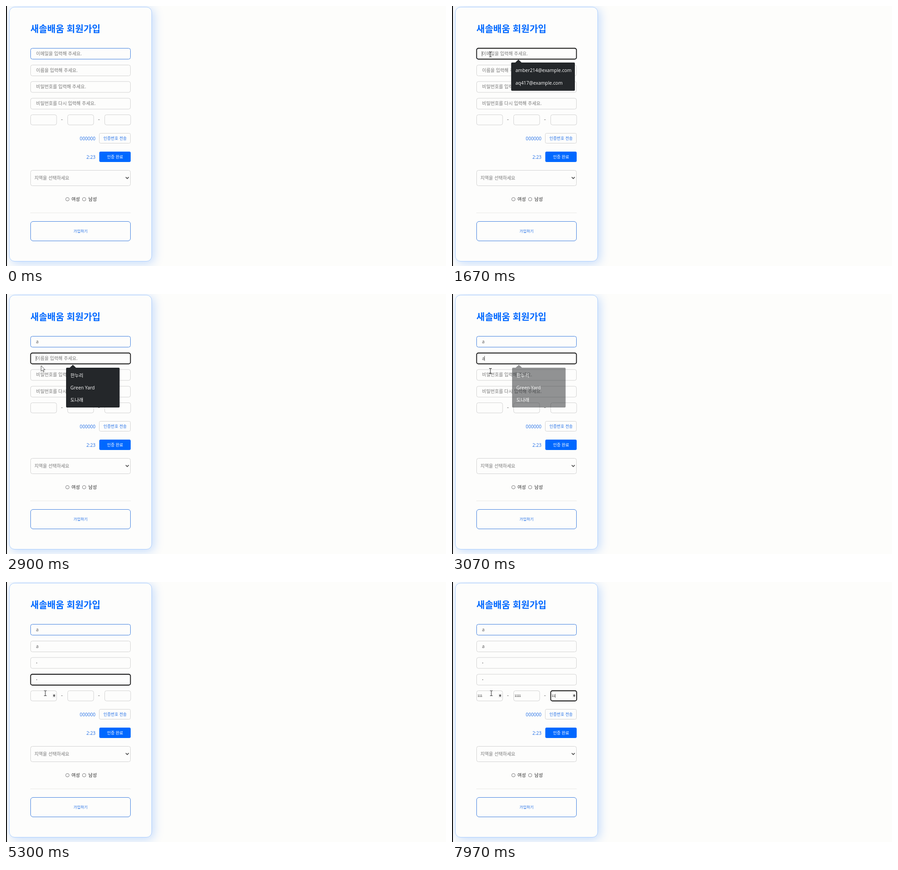
Animation of 974x575 px, one loop 8000 ms. Source, as an HTML page:

```html
<!DOCTYPE html>
<html lang="ko">
<head>
<meta charset="utf-8">
<title>회원가입</title>
<style>
  html, body { margin: 0; width: 100%; height: 100%; overflow: hidden; background: #fdfdfb; }
  svg { display: block; position: absolute; left: 0; top: 0; }
  .card {
    position: absolute; left: 7px; top: 2px; width: 316px; height: 563px; box-sizing: border-box;
    border: 1px solid #aacdff; border-radius: 12px; background: #fdfdfc;
    box-shadow: 4px 4px 22px rgba(0, 104, 255, .23);
  }
  .edge { position: absolute; left: 0; top: 0; width: 2px; height: 575px; background: #000; }
  text { font: 10.1px "Noto Sans CJK KR", "Noto Sans CJK", sans-serif; fill: #222; }
  .title { font-size: 20.3px; font-weight: 700; fill: #0068ff; }
  .hint { fill: #777; }
  .blue { fill: #1f6de6; }
  .latin { font-family: "Open Sans", "Noto Sans", sans-serif; }
  .typed { font-family: "Open Sans", "Noto Sans", sans-serif; font-size: 10px; fill: #555; }
  .digits { font: 7px "Liberation Sans", sans-serif; fill: #222; }
  .box { fill: none; stroke: #d2d2d2; }
  .box.on { stroke: #3f7fdf; }
  .ring { fill: none; stroke: #101010; stroke-width: 1.8; }
  .popup path { fill: #24272a; }
  .popup text { font-family: "Open Sans", "Noto Sans CJK KR", "Noto Sans CJK", sans-serif; font-size: 10.4px; fill: #fff; }
</style>
</head>
<body>
<div class="card"></div>
<div class="edge"></div>
<svg id="stage" width="974" height="575" viewBox="0 0 974 575">
  <text class="title" x="54" y="58">새솔배움 회원가입</text>
  <text x="122" y="255">-</text>
  <text x="204" y="255">-</text>
  <text class="blue latin" x="198" y="297" text-anchor="end">000000</text>
  <text class="blue latin" x="198" y="338" text-anchor="end">2:23</text>
  <rect class="box" x="206.5" y="281.5" width="69" height="22" rx="3"/>
  <text class="blue" x="241.5" y="295.5" text-anchor="middle" style="font-size:8.9px">인증번호 전송</text>
  <rect x="206.5" y="322" width="69.5" height="23" rx="3" fill="#0068ff"/>
  <text x="241.5" y="336.5" text-anchor="middle" style="font-size:9px;fill:#fff">인증 완료</text>
  <rect class="box" x="54.5" y="363.5" width="221" height="34" rx="4"/>
  <text class="hint" x="63" y="383.5">지역을 선택하세요</text>
  <path d="M265 378.3l3.4 3.4 3.4-3.4" fill="none" stroke="#555" stroke-width="1.8"/>
  <g fill="#fff" stroke="#777"><circle cx="136" cy="427.3" r="3.8"/><circle cx="173" cy="427.3" r="3.8"/></g>
  <text x="145" y="431">여성</text>
  <text x="182.5" y="431">남성</text>
  <path d="M54 457.5H276" stroke="#e8e8e6"/>
  <rect class="box on" x="54.5" y="476.5" width="221" height="43" rx="5.5"/>
  <text class="blue" x="165" y="500.5" text-anchor="middle" style="font-size:8.5px">가입하기</text>
  <g id="fields"></g>
  <rect id="caret" width=".8" fill="#222"/>
  <g id="popups"></g>
  <g id="beam" fill="none">
    <path d="M-3 -5.5H-1Q0 -5.5 0 -4.5Q0 -5.5 1 -5.5H3M0 -5V5M-3 5.5H-1Q0 5.5 0 4.5Q0 5.5 1 5.5H3" stroke="#333" stroke-width="1.1"/>
  </g>
  <path id="arrow" d="M0 0V12.5L2.9 9.8 4.8 14 6.7 13.1 4.8 9.1H8.8Z" fill="#fff" stroke="#222" stroke-width=".8"/>
</svg>
<script>
const LOOP = 8000, BLINK = 530;
const byId = id => document.getElementById(id);

function add(parent, tag, attrs, text = '') {
  const el = document.createElementNS('http://www.w3.org/2000/svg', tag);
  for (const key in attrs) el.setAttribute(key, attrs[key]);
  el.textContent = text;
  parent.append(el);
  return el;
}
const show = (el, on) => { el.style.visibility = on ? 'visible' : 'hidden'; };

// keys: moments at which a character is typed
const line = (y, from, to, hint, char, keys) =>
  ({ x: 54, y, w: 222, h: 25, from, to, hint, char, keys, pad: 12.6, advance: 5.4 });
const phone = (x, from, to, keys) =>
  ({ x, y: 240, w: 58.5, h: 23.5, from, to, hint: '', char: '1', keys, pad: 2.6, advance: 3.9, number: true });

const fields = [
  line(93, 1250, 2680, '이메일을 입력해 주세요.', 'a', [2000]),
  line(130, 2680, 3400, '이름을 입력해 주세요.', 'a', [2950]),
  line(166.5, 3400, 4300, '비밀번호를 입력해 주세요.', '•', [4000]),
  line(203.5, 4300, 5450, '비밀번호를 다시 입력해 주세요.', '•', [4700]),
  phone(54, 5450, 6400, [5830, 6000, 6170]),
  phone(136, 6400, 7300, [6560, 6720, 6880, 7040]),
  phone(218, 7300, LOOP, [7600, 7800])
];

fields.forEach((f, i) => {
  const group = byId('fields'), middle = f.y + f.h / 2;
  const frame = { x: f.x + .5, y: f.y + .5, width: f.w - 1, height: f.h - 1, rx: 4 };
  f.box = add(group, 'rect', { ...frame, class: i ? 'box' : 'box on' });
  f.ring = add(group, 'rect', { ...frame, class: 'ring' });
  f.label = add(group, 'text', { x: f.x + f.pad, y: middle + 3.2, class: 'hint' }, f.hint);
  f.value = add(group, 'text', {
    x: f.x + f.pad, y: middle + (f.number ? 2 : 3.2), class: f.number ? 'digits' : 'typed'
  });
  if (f.char === '•') f.value.style.fontSize = '8px';
  if (f.number) {
    f.spin = add(group, 'g', { transform: `translate(${f.x + 52.5} ${middle - .5})` });
    add(f.spin, 'rect', { x: -4, y: -4.5, width: 8, height: 9, fill: '#eee' });
    add(f.spin, 'path', { d: 'M-2.4 -.3L0 -2.8 2.4 -.3ZM-2.4 .3L0 2.8 2.4 .3Z', fill: '#333' });
  }
});

function addPopup(x, y, w, h, tip, rows, rowHeight, times) {
  const el = add(byId('popups'), 'g', { class: 'popup' });
  add(el, 'path', { d: `M${x + 2} ${y}H${tip - 7}L${tip} ${y - 6.5}L${tip + 7} ${y}H${x + w - 2}q2 0 2 2v${h - 4}q0 2 -2 2H${x + 2}q-2 0 -2 -2v${4 - h}q0 -2 2 -2Z` });
  rows.forEach((row, i) => add(el, 'text', { x: x + 9.5, y: y + 21 + i * rowHeight }, row));
  return { el, times };
}
// times: fade-in start and end, fade-out start and end
const popups = [
  addPopup(131, 125, 141, 62.5, 147, ['amber214@example.com', 'aq417@example.com'], 28, [1350, 1430, 2680, 2800]),
  addPopup(133, 163, 118.5, 88, 148, ['한누리', 'Green Yard', '도나래'], 27, [2740, 2800, 2950, 3190])
];

// time, x, y
const path = [
  [30, 880, 575], [450, 400, 290], [830, 110, 113], [1000, 85, 107], [1900, 85, 107],
  [2450, 60, 138], [2720, 68, 143], [3050, 85, 170], [3450, 89, 190], [4000, 89, 190],
  [4250, 88, 215], [4800, 88, 216], [5200, 87, 246], [LOOP, 87, 246]
];
const clamp = v => Math.min(1, Math.max(0, v));

function pointerAt(t) {
  const i = Math.max(1, path.findIndex(p => p[0] >= t));
  const [a, b] = [path[i - 1], path[i]];
  const k = clamp((t - a[0]) / (b[0] - a[0]));
  const ease = k * k * (3 - 2 * k);
  return [a[1] + (b[1] - a[1]) * ease, a[2] + (b[2] - a[2]) * ease];
}

function render(t) {
  const [px, py] = pointerAt(t);
  const caret = byId('caret');
  let overField = false, caretOn = false;

  for (const f of fields) {
    const focused = t >= f.from && t < f.to;
    const pressed = f.keys.filter(k => k <= t);
    const hovered = px >= f.x && px <= f.x + f.w && py >= f.y && py <= f.y + f.h;
    overField ||= hovered;
    show(f.ring, focused);
    show(f.label, !pressed.length);
    f.value.textContent = f.char.repeat(pressed.length);
    if (f.spin) show(f.spin, focused || hovered);
    if (focused) {
      const since = t - (pressed.at(-1) ?? f.from);
      const height = f.number ? 8 : 11;
      caretOn = since % (2 * BLINK) < BLINK;
      caret.setAttribute('x', f.x + f.pad - .4 + pressed.length * f.advance);
      caret.setAttribute('y', f.y + (f.h - height) / 2);
      caret.setAttribute('height', height);
    }
  }
  show(caret, caretOn);

  for (const { el, times: [a, b, c, d] } of popups)
    el.style.opacity = Math.min(clamp((t - a) / (b - a)), clamp((d - t) / (d - c)));

  for (const id of ['beam', 'arrow']) {
    const el = byId(id);
    el.setAttribute('transform', `translate(${px} ${py})`);
    show(el, t >= 30 && overField === (id === 'beam'));
  }
}

const start = performance.now();
function tick() {
  render((performance.now() - start) % LOOP);
  requestAnimationFrame(tick);
}
tick();
</script>
</body>
</html>
```
